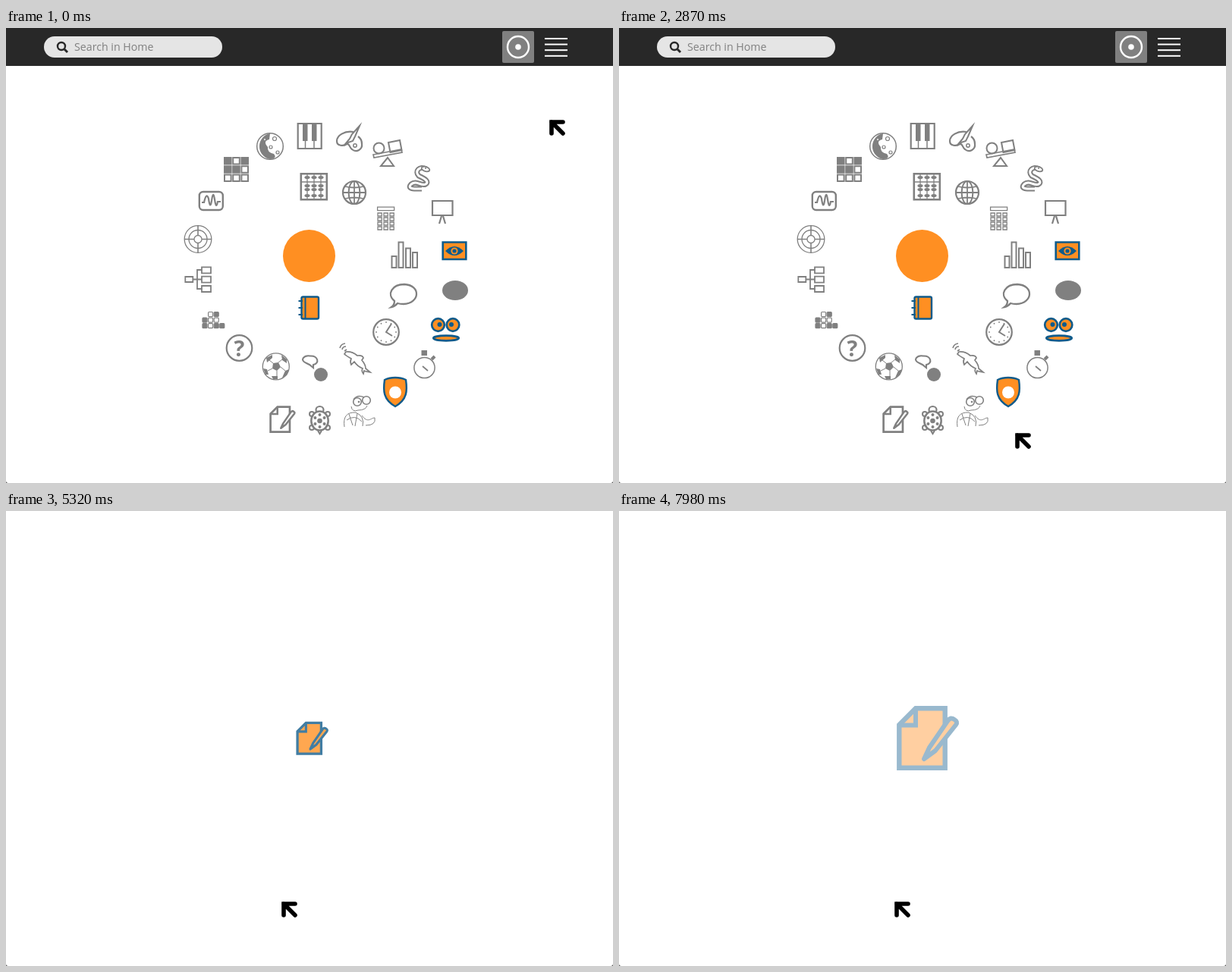
These frames come from a looping animation (800x600 px, 8 s). An HTML page with a canvas:

```html
<!DOCTYPE html>
<html lang="en">
<head>
<meta charset="utf-8">
<title>Home view</title>
<style>
html, body { margin: 0; width: 100%; height: 100%; overflow: hidden; background: #fff; }
canvas { position: absolute; left: 0; top: 0; display: block; }
#search { position: absolute; left: 90px; top: 15px; font: 14.2px/20px "Open Sans", sans-serif; color: #808080; white-space: pre; }
</style>
</head>
<body>
<canvas id="stage" width="800" height="600"></canvas>
<div id="search">Search in Home</div>
<script>
const LOOP = 8000, STEP = 70, LAUNCH = 4620;
const GRAY = '#808080', BLUE = '#0f5b8b', ORANGE = '#ff8f22', WHITE = '#fff';
const stage = document.getElementById('stage').getContext('2d');
const label = document.getElementById('search');
const home = document.createElement('canvas');
home.width = 800;
home.height = 600;
let g = home.getContext('2d');

function paint(shape, fill, width, stroke) {
  if (fill) { g.fillStyle = fill; g.fill(shape); }
  if (width) { g.lineWidth = width; g.strokeStyle = stroke || GRAY; g.stroke(shape); }
}
function path(d, fill, width, stroke) { paint(new Path2D(d), fill, width, stroke); }
function oval(x, y, rx, ry, fill, width, stroke, turn = 0) {
  const s = new Path2D();
  s.ellipse(x, y, rx, ry, turn, 0, 7);
  paint(s, fill, width, stroke);
}
function disc(x, y, r, fill, width, stroke) { oval(x, y, r, r, fill, width, stroke); }
function box(x, y, w, h, fill, width, stroke, r = 0) {
  const s = new Path2D();
  s.roundRect(x, y, w, h, r);
  paint(s, fill, width, stroke);
}

function toolbar() {
  box(0, 0, 800, 50, '#282828');
  box(50, 11, 235, 28, '#e5e5e5', 0, '', 14);
  disc(73, 24, 5, null, 2.4, '#282828');
  path('M77 28L81 32', null, 3, '#282828');
  box(654, 4, 42, 42, GRAY, 0, '', 2);
  disc(675, 25, 14, null, 2.4, WHITE);
  disc(675, 25, 3.8, WHITE);
  for (let i = 0; i < 4; i++) box(710, 13 + i * 7.6, 30, 2, WHITE);
}

function outerRing() {
  // piano
  box(384.7, 126, 31, 33, WHITE, 2.2);
  path('M394.5 146V159M406 146V159', null, 1.5);
  box(391, 126, 6.5, 23, GRAY);
  box(403, 126, 6.5, 23, GRAY);
  // palette
  path('M458 137C446 135 436 142 436 149C436 156 445 156 449 153C453 152 452 157 456 160C462 165 470 160 469 153C469 148 467 145 464 143', null, 2.2);
  path('M466 129L456 140L453 146L448 152L457 149L460 143Z', WHITE, 2);
  disc(460, 155, 2.2, null, 1.5);
  // balance
  path('M484 167L521 160L522 164L485 171Z', WHITE, 1.7);
  disc(491.5, 158.5, 7, null, 2);
  path('M504 151L519 148L521.5 161L506.5 164ZM503 171L494 182H511Z', null, 2);
  // snake
  const snake = 'M554 186C545 181 538 189 544 195C553 199 558 203 553 206C547 209 541 200 534 206C529 211 535 212 541 212H548';
  path(snake, null, 7);
  path(snake, null, 3, WHITE);
  oval(553, 186, 5.5, 3, WHITE, 1.8, GRAY, .3);
  disc(553, 185, 1, GRAY);
  // easel
  box(562, 228, 26.5, 19, null, 2.2);
  path('M574 248L571 258M576 248L579 258', null, 2.2);
  // eye
  box(575.7, 282.5, 30.6, 22.5, ORANGE, 2.6, BLUE);
  path('M579 294Q591 282 603 294Q591 306 579 294Z', BLUE);
  disc(591, 294, 4.6, ORANGE);
  disc(591, 294, 2.6, BLUE);
  // cartoon stand-in
  oval(592, 346, 17, 13, GRAY);
  // face
  for (const x of [569.5, 589]) {
    disc(x, 391.5, 8.3, ORANGE, 2.7, BLUE);
    disc(x + (x < 580 ? 2 : -2), 391, 3, BLUE);
  }
  oval(580, 409, 16.7, 3.3, ORANGE, 2.7, BLUE);
  // stopwatch
  disc(551.5, 448, 13.6, null, 1.5);
  box(547.5, 425, 7.5, 7, GRAY);
  path('M561 437L565 433', null, 4);
  path('M549 446L556 452', null, 1.7);
  // shield
  path('M513 461Q521 461 527 464C529 478 529 490 513 499C497 490 497 478 499 464Q505 461 513 461Z', ORANGE, 2.4, BLUE);
  disc(513, 480.5, 8, WHITE);
  // bespectacled turtle
  path('M446 526Q443 506 461 507Q473 512 470 525M449 517Q460 509 469 519M452 509L457 524M463 508L460 525M455 499Q456 507 464 504Q474 504 476 498M469 511C477 522 481 514 486 514Q488 524 474 524', null, 1);
  path('M458 490Q463 483 472 487', null, 1.5);
  disc(463, 493, 5.3, null, 1.6);
  disc(475, 491, 5.3, null, 1.6);
  disc(465, 493, 1.3, GRAY);
  // turtle
  oval(413.5, 503.5, 5, 4.5, null, 2.2);
  for (const [x, y] of [[403, 509], [424, 509], [403, 527], [424, 527]]) disc(x, y, 3, null, 2);
  path('M411 531L413.5 535L416 531', null, 2);
  oval(413.5, 518, 11.2, 12.5, WHITE, 2.5);
  disc(413.5, 518, 3.3, GRAY);
  for (let i = 0; i < 6; i++) {
    const a = i * Math.PI / 3 + .52;
    disc(413.5 + 7 * Math.cos(a), 518 + 8 * Math.sin(a), 2, GRAY);
  }
}

function leftArc() {
  // moon
  disc(348, 156, 17.3, WHITE, 1.5);
  path('M348 139A17.3 17.3 0 0 0 348 173Q358 172 353 166Q344 164 345 157Q338 149 347 147Z', GRAY);
  for (const [x, y, r] of [[354, 146, 2.5], [349, 157, 2], [358, 164, 2], [341, 147, 1.5]]) disc(x, y, r, WHITE, 1.2);
  // tiles
  for (let i = 0; i < 9; i++) {
    const open = i === 1 || i > 4;
    box(288 + i % 3 * 11.2, 171 + Math.floor(i / 3) * 11.2, 8.6, 8.6, open ? WHITE : GRAY, 2);
  }
  // scope
  box(254.8, 216, 31, 24, null, 2.4, GRAY, 5);
  path('M258 230H261Q264 216 267 225Q269 240 271 228Q273 213 275 226Q277 240 279 229H283', null, 2.2);
  // target
  disc(253, 278.5, 17.8, null, 1.3);
  disc(253, 278.5, 12, null, 1.3);
  disc(253, 278.5, 5, null, 1.3);
  path('M235 278.5H248M258 278.5H271M253 261V273.5M253 283.5V296', null, 1.6);
  // tree
  box(236.3, 328, 10, 7, null, 1.8);
  path('M246 331.5H258M258 319H252V344H258', null, 1.8);
  for (const y of [315.3, 327.7, 340]) box(258, y, 12, 8, WHITE, 1.8);
  // blocks
  const rows = ['.o#.', '#oo.', '#o##'];
  rows.forEach((row, j) => [...row].forEach((c, i) => {
    if (c !== '.') box(259 + i * 7.6, 374.5 + j * 7.6, 6, 6, c === '#' ? GRAY : WHITE, 1.2, GRAY, 1);
  }));
  // help
  disc(307.5, 422, 16.8, null, 2.2);
  g.fillStyle = GRAY;
  g.font = 'bold 29px "Open Sans", sans-serif';
  g.textAlign = 'center';
  g.fillText('?', 307.5, 432.5);
  // football
  disc(355.8, 446.4, 17.5, WHITE, 1.3);
  path('M352 442L359 441L362 447L357 452L351 449ZM343 435L351 431L351 435L344 441ZM363 431L370 437L370 442L364 438ZM339 449L344 450L346 457L342 457ZM368 452L373 450L370 458L364 461ZM350 459L358 459L358 463L352 463Z', GRAY);
  path('M352 442L347 438M359 441L364 437M362 447L368 452M357 452L357 460M351 449L345 452', null, 1);
  // chat
  path('M396 442C386 438 393 431 401 432.5C411 432 414 442 405 444L405 448L400 444Z', WHITE, 2.1);
  disc(415, 457, 9, GRAY);
}

function innerRing() {
  // abacus
  box(388.8, 192.2, 34, 34, WHITE, 2.6);
  for (const x of [397, 406, 415]) {
    path(`M${x} 192V226`, null, 1.3);
    for (const y of [197, 208, 213, 221]) oval(x, y, 3.6, 2.1, GRAY);
  }
  path('M389 203H423', null, 1.5);
  // globe
  disc(459, 217, 15, null, 2.2);
  oval(459, 217, 7.4, 15, null, 2);
  path('M459 202V232M444 217H474M447 209Q459 212 471 209M447 225Q459 222 471 225', null, 1.8);
  // calculator
  box(489.6, 236.2, 22, 4.5, null, 1.3);
  for (let i = 0; i < 12; i++) box(490 + i % 3 * 8, 244 + Math.floor(i / 3) * 6, 5.2, 4, null, 1.3);
  // chart
  box(508.5, 301, 6, 15, null, 2);
  box(517.5, 282.5, 6, 33.5, null, 2);
  box(527, 290.5, 6, 25.5, null, 2);
  box(536, 296, 6, 20, null, 2);
  // speech
  path('M512 360C501 351 509 338 525 338C547 339 546 363 524 364Q519 364 516 363Q513 367 508 368Q512 365 512 360Z', null, 2.3);
  // clock
  disc(501, 401, 16.8, null, 2.2);
  for (let i = 0; i < 12; i++) {
    const a = i * Math.PI / 6;
    disc(501 + 13 * Math.cos(a), 401 + 13 * Math.sin(a), .9, GRAY);
  }
  path('M508 390L501 401L509 406', null, 2);
  // dolphin
  path('M448 427Q456 426 463 432Q470 431 471 435L469 438Q474 444 474 449L480 454Q474 453 472 452L471 456Q468 452 470 449Q463 446 459 440L455 444Q453 440 455 436Q448 432 446 430Z', WHITE, 1.7);
  path('M440 422A8 8 0 0 1 447 416M443 424A5 5 0 0 1 448 420M446 426L449 424', null, 1.6);
  // person stand-in
  disc(399.5, 300.5, 34.5, ORANGE);
  // journal
  box(389.5, 354.5, 22.5, 29, ORANGE, 2.4, BLUE, 2);
  path('M394.5 355V383M385.5 360H391M385.5 369H391M385.5 378H391', null, 2, BLUE);
}

function page(x, y, scale, fill, stroke) {
  g.save();
  g.translate(x, y);
  g.scale(scale, scale);
  path('M-30.7 -18L-9 -39.7H29.7V38.7H-30.7Z', fill, 6.4, stroke);
  path('M-9 -39V-17.5H-30', null, 6, stroke);
  g.lineJoin = 'round';
  path('M2 27L9 12L33 -23Q37 -29 42 -25Q47 -22 44 -18L17 16Z', fill, 6, stroke);
  g.restore();
}

function pointer(x, y) {
  g.save();
  g.translate(x, y);
  g.lineCap = 'round';
  for (const [w, c] of [[8, WHITE], [5.6, '#000']]) path('M3 18V3H18M3 3L18 18', null, w, c);
  g.restore();
}

// time, x, y of the pointer tip
const route = [
  [70, 716, 121], [800, 720, 240], [1540, 709, 358], [1930, 709, 358], [2450, 630, 447],
  [2870, 522, 534], [3220, 447, 560], [3570, 392, 544], [3990, 363, 515]
];
function slope(i, k) {
  const a = route[i - 1], b = route[i], c = route[i + 1];
  if (!a || !c) return 0;
  const still = p => p[1] === b[1] && p[2] === b[2];
  return still(a) || still(c) ? 0 : (c[k] - a[k]) / (c[0] - a[0]);
}
function tip(t) {
  const end = route.length - 1;
  if (t <= route[0][0]) return route[0].slice(1);
  if (t >= route[end][0]) return route[end].slice(1);
  const i = route.findIndex(p => p[0] > t) - 1;
  const a = route[i], b = route[i + 1], d = b[0] - a[0];
  const u = (t - a[0]) / d, v = 1 - u;
  return [1, 2].map(k =>
    a[k] * (1 + 2 * u) * v * v + slope(i, k) * d * u * v * v +
    b[k] * u * u * (3 - 2 * u) - slope(i + 1, k) * d * u * u * v);
}

function drawHome(t, x, y) {
  g.drawImage(home, 0, 0);
  const press = Math.min(1, Math.max(0, (t - 4060) / 280));
  if (x > 335 && x < 387 && y > 489 && y < 542) {
    box(335 - 4 * press, 489 - 5 * press, 52 + 11 * press, 53 + 10 * press, '#e5e5e5', 0, '', 5);
  }
  page(361.5 + press, 516.3, .42 * (1 + .2 * press), WHITE, GRAY);
}

function drawSplash(t) {
  const scale = Math.min(1, (t - LAUNCH) / 1350);
  const fade = Math.min(1, .79 * Math.exp((5320 - t) / 4300));
  const tint = (r, gr, b) => `rgb(${[r, gr, b].map(c => Math.round(255 + (c - 255) * fade))})`;
  if (scale > 0) page(400, 300, scale, tint(255, 143, 34), tint(15, 91, 139));
}

toolbar();
outerRing();
leftArc();
innerRing();
g = stage;

function frame() {
  const t = Math.floor(performance.now() % LOOP / STEP) * STEP;
  const [x, y] = tip(t);
  g.fillStyle = WHITE;
  g.fillRect(0, 0, 800, 600);
  const atHome = t < LAUNCH;
  label.style.visibility = atHome ? 'visible' : 'hidden';
  if (atHome) drawHome(t, x, y);
  else drawSplash(t);
  pointer(x, y);
  path('M0 597V600H3Q0 600 0 597ZM800 597V600H797Q800 600 800 597Z', '#444');
  requestAnimationFrame(frame);
}
frame();
</script>
</body>
</html>
```
